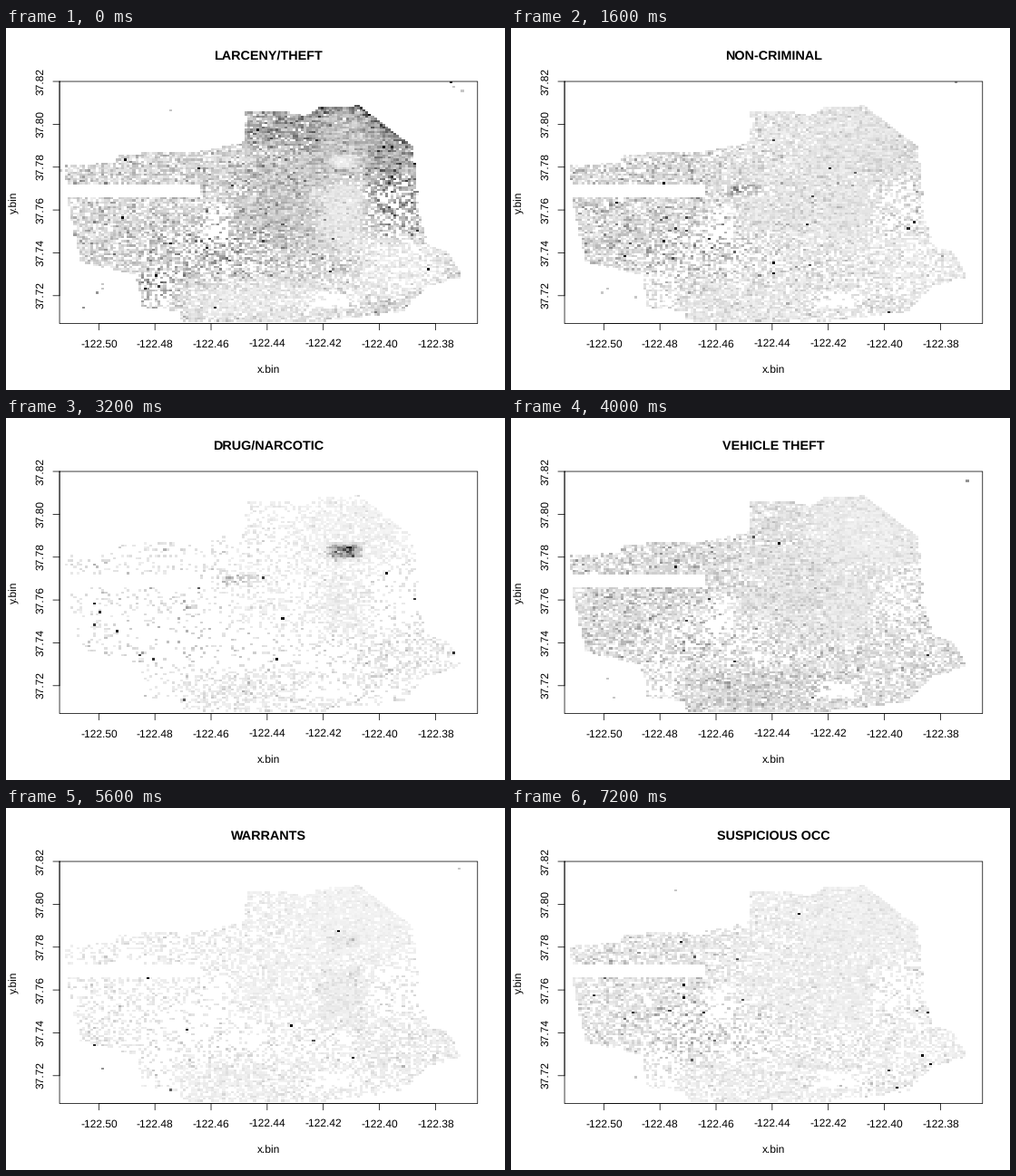
A matplotlib script that plays this animation: 550 by 400 pixels, repeating every 8000 ms.

```python
import numpy as np
import matplotlib.pyplot as plt
from matplotlib.animation import FuncAnimation

W, H, DPI = 550, 400, 100
PX = 72 / DPI
LINE = 14.4                     # height of one margin line
LEFT, RIGHT = 4.1 * LINE, W - 2.1 * LINE
TOP, BOTTOM = 4.1 * LINE, H - 5.1 * LINE
LON, LAT, STEP = -122.514, 37.82, 0.001
COLS, ROWS = 149, 113
CELL_W, CELL_H = (RIGHT - LEFT) / COLS, (BOTTOM - TOP) / ROWS

X, Y = np.meshgrid(LEFT + CELL_W * (np.arange(COLS) + 0.5),
                   TOP + CELL_H * (np.arange(ROWS) + 0.5))

# Key points of the shoreline and the city limit, in stage pixels
NORTH = [(64, 152), (121, 149), (125, 139), (215, 136), (262, 126), (264, 93),
         (302, 91), (330, 97), (346, 88), (388, 86), (448, 130), (457, 213),
         (466, 240), (487, 248), (500, 268)]
SOUTH = [(64, 170), (82, 258), (146, 273), (148, 308), (188, 312), (195, 323),
         (335, 325), (437, 313), (466, 284), (500, 277)]

# Districts as soft-edged boxes: centre and half size
PLACES = {
    "west": (145, 200, 95, 80),
    "hills": (228, 248, 75, 28),
    "peaks": (232, 215, 18, 22),
    "haight": (258, 178, 18, 5),
    "center": (295, 190, 50, 50),
    "marina": (303, 110, 42, 24),
    "downtown": (385, 125, 60, 42),
    "tenderloin": (373, 147, 17, 8),
    "harbor": (425, 145, 28, 34),
    "mission": (373, 205, 28, 34),
    "slopes": (425, 195, 30, 32),
    "bayview": (437, 265, 55, 32),
    "woods": (358, 300, 28, 10),
    "south": (285, 302, 100, 24),
    "lake": (165, 290, 22, 20),
}


def place(name):
    cx, cy, sx, sy = PLACES[name]
    return np.exp(-((X - cx) / sx) ** 4 - ((Y - cy) / sy) ** 4)


def field(base, **weights):
    return base + sum(w * place(name) for name, w in weights.items())


def streaks(rng):
    """Unit noise that runs on slightly from one column to the next."""
    z = rng.standard_normal(X.shape)
    return (z + 0.6 * np.roll(z, 1, axis=1)) / 1.17


def cell(x, y):
    return int((y - TOP) / CELL_H), int((x - LEFT) / CELL_W)


def build_city():
    rng = np.random.default_rng(37)
    north = np.interp(X, *zip(*NORTH))
    south = np.interp(X, *zip(*SOUTH))
    land = (Y > north) & (Y < south) & (X > 64) & (X < 501)
    park = (X < 214) & (Y > 172.5) & (Y < 188)
    cover = field(0.92, center=0.08, downtown=0.08, mission=0.08, peaks=-0.6,
                  hills=-0.25, haight=-0.3, woods=-0.75, slopes=-0.35,
                  bayview=-0.25, lake=-0.55)
    present = land & ~park & (rng.random(X.shape) < cover)
    events = field(22, center=25, marina=30, downtown=90, mission=70,
                   bayview=30, south=22, hills=-9)
    events = np.maximum(3, np.round(events * np.exp(0.4 * streaks(rng))))

    # Lone cells: a diagonal of islets, the far shore and the lakeside
    strays = [(491 + 4 * i, 61 + 3 * i) for i in range(4)]
    strays += [(518, 82), (181, 91), (60, 157)]
    strays += list(zip(rng.uniform(85, 145, 8), rng.uniform(276, 312, 8)))
    for x, y in strays:
        present[cell(x, y)] = True
        events[cell(x, y)] = 5
    shore = np.exp(-np.clip(Y - north, 0, None) / 6) * (X > 335) * (X < 452)
    return present, events, shore


PRESENT, EVENTS, SHORE = build_city()
ODD = np.where(PRESENT, EVENTS ** -1.5, 0).ravel()
ODD /= ODD.sum()
slides = []


def add(title, rate, dots=8, scale=1.0):
    """Simulate one category's share of the events in every cell."""
    rng = np.random.default_rng(100 + len(slides))
    rate = np.clip(rate, 0.006, 0.9) * np.exp(0.3 * streaks(rng))
    count = np.where(PRESENT, rng.poisson(EVENTS * rate), 0)
    share = np.clip(count / EVENTS / scale, 0, 1)
    shade = np.where(count > 0, 0.97 * (1 - share), 1.0)
    spots = rng.choice(ODD.size, dots, replace=False, p=ODD)
    shade.flat[spots] = rng.uniform(0, 0.4, dots)
    slides.append((title, shade))


avenues = sum((abs(X - x) < 2) & (Y > 190) & (Y < 265) for x in (117, 179))
diagonals = np.sin((Y + 0.6 * X) * 2 * np.pi / 12) > 0.4

add("LARCENY/THEFT",
    field(0.13, marina=0.19, downtown=0.09, harbor=0.1, tenderloin=-0.16,
          mission=-0.07, center=0.07, slopes=0.16, bayview=-0.08,
          south=-0.07, hills=0.08, lake=0.1) + 0.35 * SHORE, dots=14)
add("OTHER OFFENSES",
    field(0.09, downtown=-0.03, marina=-0.03, mission=0.05, slopes=0.03,
          bayview=0.06, south=0.06)
    + 0.2 * avenues
    + diagonals * field(0, bayview=0.3, south=0.06), dots=20)
add("NON-CRIMINAL",
    field(0.08, west=0.06, haight=0.2, harbor=0.02, hills=0.03,
          bayview=-0.02, south=-0.01), dots=22)
add("ASSAULT",
    field(0.07, marina=-0.02, downtown=-0.02, tenderloin=0.03, mission=0.02,
          bayview=0.04, south=0.03))
add("DRUG/NARCOTIC",
    field(0.008, tenderloin=0.2, haight=0.09, mission=0.012, bayview=0.02,
          downtown=0.004, south=0.012), dots=14, scale=0.5)
add("VEHICLE THEFT",
    field(0.09, west=0.03, downtown=-0.04, mission=-0.02, bayview=0.03,
          south=0.05))
add("VANDALISM",
    field(0.06, west=0.05, hills=0.06, tenderloin=-0.03, downtown=-0.01,
          bayview=-0.02, south=-0.01), dots=16)
add("WARRANTS",
    field(0.025, tenderloin=0.04, mission=0.03, bayview=0.03, south=0.01))
add("BURGLARY",
    field(0.045, west=0.025, marina=0.08, center=0.03, downtown=-0.01,
          hills=0.02, bayview=-0.01, south=-0.01, lake=0.05)
    + 0.05 * SHORE, dots=18)
add("SUSPICIOUS OCC",
    field(0.04, west=0.04, hills=0.02), dots=20)


plt.rcParams.update({"font.family": "Liberation Sans", "text.hinting": "none"})
fig = plt.figure(figsize=(W / DPI, H / DPI), dpi=DPI, facecolor="white")
ax = fig.add_axes([0, 0, 1, 1])
ax.axis("off")


def line(xs, ys):
    ax.plot(xs, ys, color="black", lw=0.75 * PX, snap=False,
            solid_capstyle="round")


def label(x, y, text, size=12, **kw):
    return ax.text(x, y, text, fontsize=size * PX, ha="center", va="baseline",
                   rotation_mode="anchor", color="black", **kw)


image = ax.imshow(slides[0][1], cmap="gray", vmin=0, vmax=1, aspect="auto",
                  extent=(LEFT, RIGHT, BOTTOM, TOP), interpolation="nearest")
line([LEFT, RIGHT, RIGHT, LEFT, LEFT], [TOP, TOP, BOTTOM, BOTTOM, TOP])

lons = -122.5 + 0.02 * np.arange(7)
lats = 37.82 - 0.02 * np.arange(6)
xticks = LEFT + (lons - LON) / STEP * CELL_W
yticks = TOP + (LAT - lats) / STEP * CELL_H
line(xticks[[0, -1]], [BOTTOM, BOTTOM])
line([LEFT, LEFT], yticks[[0, -1]])
for x, lon in zip(xticks, lons):
    line([x, x], [BOTTOM, BOTTOM + LINE / 2])
    label(x, BOTTOM + 1.8 * LINE, f"{lon:.2f}")
for y, lat in zip(yticks, lats):
    line([LEFT - LINE / 2, LEFT], [y, y])
    label(LEFT - 1.25 * LINE, y - 0.5, f"{lat:.2f}", rotation=90)

MID_X, MID_Y = (LEFT + RIGHT) / 2, (TOP + BOTTOM) / 2
label(MID_X, BOTTOM + 3.8 * LINE, "x.bin")
label(LEFT - 3.2 * LINE, MID_Y - 0.5, "y.bin", rotation=90)
title = label(MID_X, 35, "", size=1.2 * 12, weight="bold")
ax.set_xlim(0, W)
ax.set_ylim(H, 0)


def update(i):
    name, shade = slides[i]
    title.set_text(name)
    image.set_data(shade)
    return title, image


anim = FuncAnimation(fig, update, frames=len(slides), interval=800,
                     repeat=True, repeat_delay=0)
plt.show()
```
